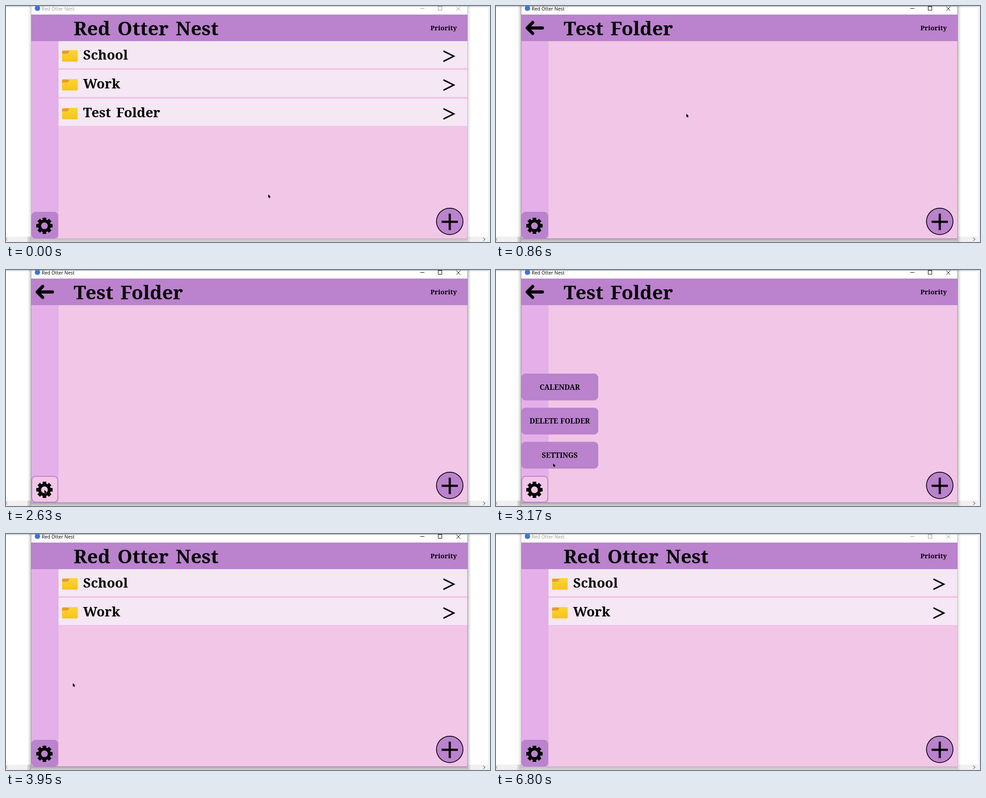
Recreate the animation shown at these times as an HTML page with a canvas. Size 1070x524 px, loop 6.91 s.

```html
<!DOCTYPE html>
<html lang="en">
<head>
<meta charset="utf-8">
<title>Red Otter Nest</title>
<style>
  html, body { margin: 0; width: 100%; height: 100%; overflow: hidden; background: #fff; }
  canvas { display: block; }
</style>
</head>
<body>
<canvas id="stage" width="1070" height="524"></canvas>
<script>
const ctx = document.getElementById('stage').getContext('2d');
const LOOP = 6910;
const APP = 'Red Otter Nest';
const PURPLE = '#bb82cd', SIDE = '#e5afe9', PINK = '#f1c6e6', ROW = '#f5e7f4';
const SERIF = '"Noto Serif", serif';

// Moments of hard change
const ACTIVATE = 740, OPEN = 860, MENU = 2690, REMOVE = 3950, DEACTIVATE = 6800;
const HOVER_LAG = 70;

const easeInOut = u => u * u * (3 - 2 * u);
const easeOut = u => 1 - (1 - u) ** 3;

// Each move bends from the last resting place, past a control point, to the next one
const home = [580, 418];
const moves = [
  { from: 40, to: 650, bend: [510, 320], end: [421, 239], ease: easeInOut },
  { from: 1480, to: 2130, bend: [120, -56], end: [103, 248], ease: easeInOut },
  { from: 2140, to: 2650, bend: [80, 368], end: [85, 488], ease: easeOut },
  { from: 2840, to: 3400, bend: [120, 498], end: [148, 331], ease: easeInOut },
  { from: 5580, to: 6060, bend: [1027, 676], end: [687, 356], ease: easeInOut }
];

function pointer(t) {
  let spot = home;
  for (const { from, to, bend, end, ease } of moves) {
    if (t <= from) break;
    const u = ease(Math.min((t - from) / (to - from), 1)), v = 1 - u;
    spot = spot.map((p, k) => v * v * p + 2 * u * v * bend[k] + u * u * end[k]);
  }
  return spot;
}

const inside = ([px, py], x, y, w, h) => px >= x && px < x + w && py >= y && py < y + h;

function rect(x, y, w, h, color) {
  ctx.fillStyle = color;
  ctx.fillRect(x, y, w, h);
}

function disc(x, y, r, color) {
  ctx.beginPath();
  ctx.arc(x, y, r, 0, 2 * Math.PI);
  ctx.fillStyle = color;
  ctx.fill();
}

function line(points, width, color = '#000', cap = 'butt') {
  ctx.beginPath();
  points.forEach(([x, y]) => ctx.lineTo(x, y));
  ctx.lineWidth = width;
  ctx.strokeStyle = color;
  ctx.lineCap = cap;
  ctx.lineJoin = cap === 'round' ? 'round' : 'miter';
  ctx.stroke();
}

// A ">" (or "<" with negative w) whose tip is at x, y
function chevron(x, y, w, h, width, color, cap) {
  line([[x - w, y - h], [x, y], [x - w, y + h]], width, color, cap);
}

function text(str, x, y, size, { align = 'left', family = SERIF, weight = 700, color = '#000', gap = 0 } = {}) {
  ctx.font = `${weight} ${size}px ${family}`;
  ctx.wordSpacing = gap + 'px';
  ctx.textAlign = align;
  ctx.fillStyle = color;
  ctx.fillText(str, x, y);
}

function fade(x, y, w, h, x0, y0, x1, y1, alpha) {
  const g = ctx.createLinearGradient(x0, y0, x1, y1);
  g.addColorStop(0, `rgba(0,0,0,${alpha})`);
  g.addColorStop(1, 'rgba(0,0,0,0)');
  rect(x, y, w, h, g);
}

function backdrop(active) {
  rect(0, 0, 1070, 524, '#fff');
  rect(0, 0, 1070, 1, '#b4b4b4');
  rect(0, 2, 1066, 1, '#e2e2e2');
  rect(1066, 2, 4, 522, '#f0f0f0');
  rect(0, 512, 1066, 12, '#f0f0f0');
  rect(47, 512, 973, 12, '#dadada');
  chevron(0, 518, -3, 3, 1.2, '#a8a8a8');
  chevron(1059, 518, 4, 3.5, 1.3, '#777');
  const alpha = active ? 0.22 : 0.12;
  fade(48, 0, 8, 524, 56, 0, 48, 0, alpha);
  fade(1020, 0, 8, 524, 1020, 0, 1028, 0, alpha);
  fade(56, 517, 964, 7, 0, 517, 0, 525, alpha);
}

function titleBar(active) {
  const ink = active ? '#000' : '#999';
  rect(56, 0, 964, 19, '#fff');
  rect(55, 0, 966, 1, active ? '#777' : '#aaa');
  disc(69.5, 5, 6, '#3f74d6');
  text(APP, 79, 10, 10.5, { family: '"Open Sans", sans-serif', weight: 400, color: ink });
  line([[916, 5.5], [925, 5.5]], 1, ink);
  ctx.strokeRect(955.5, 1.5, 8, 8);
  line([[995.5, 1.5], [1004.5, 10.5]], 1, ink);
  line([[1004.5, 1.5], [995.5, 10.5]], 1, ink);
}

function button(x, y, w, h, hovered) {
  const inset = hovered ? 1 : 0;
  ctx.beginPath();
  ctx.roundRect(x + inset, y + inset, w - 2 * inset, h - 2 * inset, 9);
  ctx.fillStyle = hovered ? PINK : PURPLE;
  ctx.fill();
  if (hovered) {
    ctx.lineWidth = 2;
    ctx.strokeStyle = PURPLE;
    ctx.stroke();
  }
}

function gear(x, y, hole) {
  ctx.save();
  ctx.translate(x, y);
  disc(0, 0, 14, '#000');
  for (let i = 0; i < 8; i++) {
    ctx.fillRect(-4, -18, 8, 7);
    ctx.rotate(Math.PI / 4);
  }
  disc(0, 0, 7.5, hole);
  ctx.restore();
}

function plusButton() {
  disc(981, 478.2, 30.2, '#000');
  disc(981, 478.2, 28.5, PURPLE);
  line([[963, 479.2], [999, 479.2]], 4.8);
  line([[981, 461], [981, 497.5]], 4.8);
}

function folderIcon(x, y) {
  ctx.beginPath();
  ctx.roundRect(x, y + 2, 20, 14, 2);
  ctx.fillStyle = '#ea9a2e';
  ctx.fill();
  const g = ctx.createLinearGradient(0, y, 0, y + 27);
  g.addColorStop(0, '#ffd531');
  g.addColorStop(1, '#f5c31c');
  ctx.fillStyle = g;
  ctx.beginPath();
  ctx.roundRect(x, y + 9, 34.5, 17.5, 2);
  ctx.roundRect(x + 16, y + 1, 18.5, 12, 2);
  ctx.fill();
  ctx.beginPath();
  ctx.moveTo(x + 12, y + 9);
  ctx.lineTo(x + 17, y + 2);
  ctx.lineTo(x + 17, y + 10);
  ctx.fill();
}

function folderRow(name, y, hovered) {
  rect(116, y, 904, 60, hovered ? PINK : ROW);
  folderIcon(124, y + 19);
  text(name, 170.5, y + 41, 29.5, { gap: 4 });
  chevron(990, y + 33.5, 23, 11.5, 3.1);
}

function cursor([x, y]) {
  ctx.save();
  ctx.translate(x - 0.3, y);
  const shape = new Path2D('M0 0V8L2 6.400L3 9L4.500 8.300L3.400 5.800H5.800Z');
  ctx.lineWidth = 0.8;
  ctx.strokeStyle = 'rgba(255,255,255,.7)';
  ctx.stroke(shape);
  ctx.fillStyle = '#000';
  ctx.fill(shape);
  ctx.restore();
}

function draw(t) {
  const active = t >= ACTIVATE && t < DEACTIVATE;
  const inFolder = t >= OPEN && t < REMOVE;
  const spot = pointer(t - HOVER_LAG);

  backdrop(active);
  titleBar(active);
  rect(56, 19, 964, 59, PURPLE);
  rect(56, 78, 60, 438, SIDE);
  rect(116, 78, 904, 438, PINK);
  const edge = active ? '#a18ba8' : '#c1b3c5';
  rect(55, 0, 1, 517, edge);
  rect(1020, 0, 1, 517, edge);
  rect(55, 516, 966, 1, edge);

  text(inFolder ? 'Test Folder' : APP, 149.5, 65, 42, { gap: 5 });
  text('Priority', 967.5, 54, 14.7, { align: 'center' });

  if (inFolder) {
    line([[70, 48.7], [102.5, 48.7]], 7, '#000', 'round');
    chevron(69, 48.7, -12, 12.2, 7, '#000', 'round');
  } else {
    const names = ['School', 'Work'];
    if (t < OPEN) names.push('Test Folder');
    names.forEach((name, i) => {
      const y = 78 + 64 * i;
      folderRow(name, y, inside(spot, 116, y, 904, 60));
    });
  }

  if (t >= MENU && t < REMOVE) {
    ['CALENDAR', 'DELETE FOLDER', 'SETTINGS'].forEach((label, i) => {
      const y = 230 + 75.7 * i;
      const hovered = inside(spot, 56, y, 170, 59.5);
      button(56, y, 170, 59.5, hovered);
      text(label, 141, y + 35.5, 15.6, { align: 'center', gap: 1 });
    });
  }

  const gearHovered = inside(spot, 56, 457, 59.5, 59.5);
  button(56, 457, 59.5, 59.5, gearHovered);
  gear(85, 488, gearHovered ? PINK : PURPLE);
  plusButton();
  if (t < DEACTIVATE) cursor(pointer(t));
}

const start = performance.now();
function tick() {
  draw((performance.now() - start) % LOOP);
  requestAnimationFrame(tick);
}
tick();
</script>
</body>
</html>
```
